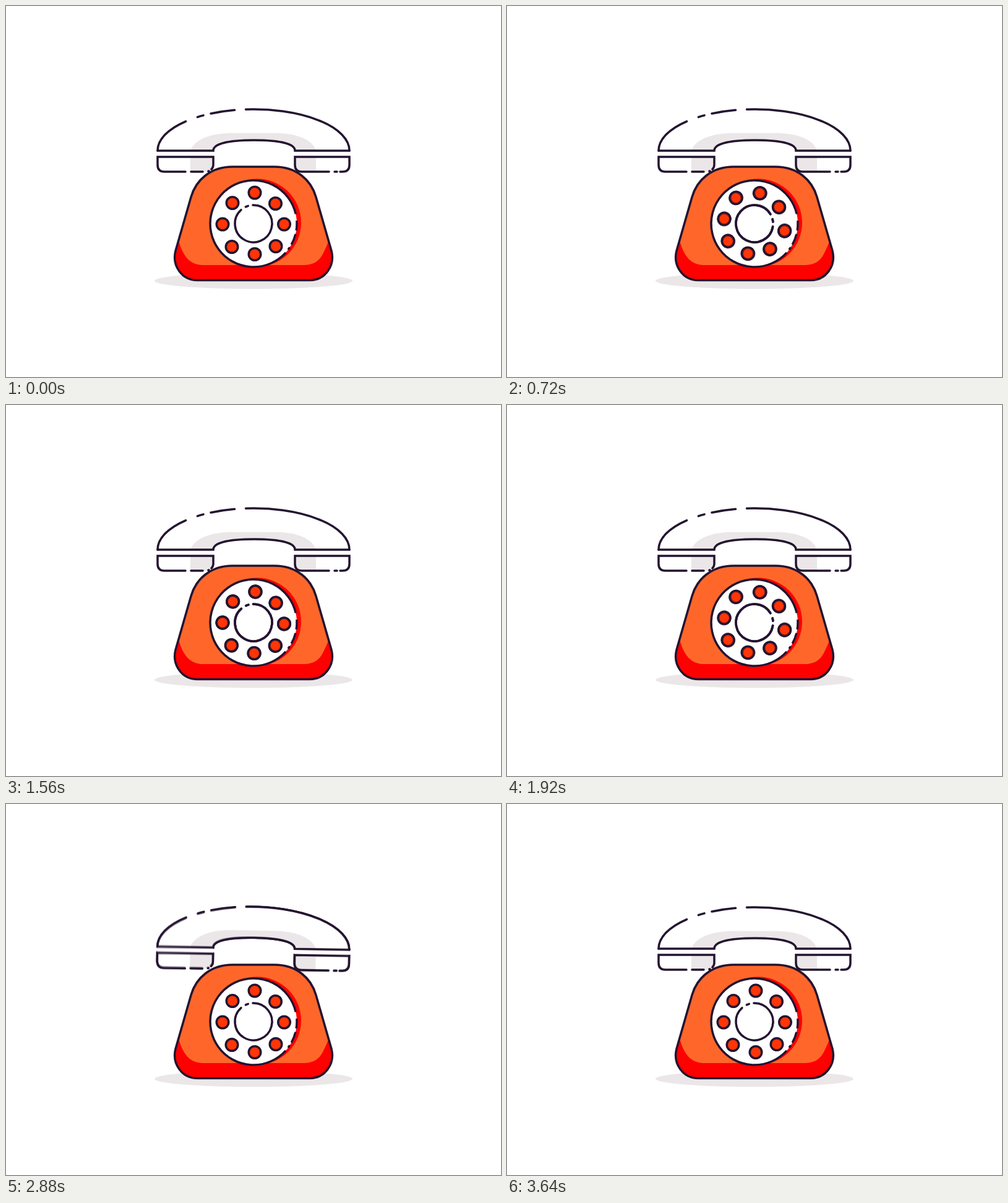
Write an HTML page that moves like this. It is 800 px wide and 600 px high and loops after 3760 ms.

```html
<!DOCTYPE html>
<html lang="en">
<head>
<meta charset="utf-8">
<title>Ringing telephone</title>
<style>
  html, body { margin: 0; width: 100%; height: 100%; overflow: hidden; background: #fff; }
  svg { display: block; width: 100%; height: 100%; }
  .line { fill: none; stroke: #241430; stroke-width: 3.5; stroke-linecap: round; stroke-linejoin: miter; }
  .shade { fill: #ebe7e8; }
  .white { fill: #fff; }
  .red { fill: #f00; }
</style>
</head>
<body>
<svg viewBox="0 0 800 600">
  <defs>
    <path id="body" d="M366 260H434C469 260 493 281 501 309L526 396C532 420 516 443.500 491 443.500H309C284 443.500 268 420 274 396L299 309C307 281 331 260 366 260Z"/>
    <clipPath id="bodyClip"><use href="#body"/></clipPath>
    <g id="rotor">
      <path id="hub" class="line"/>
      <g id="holes" class="line" style="fill:#ff3507"></g>
    </g>
    <g id="handset">
      <path class="white" d="M245 234A155 67 0 0 1 555 234V257Q555 268 544 268H478Q467 268 467 257V234C467 222 440 217 401 217S335 222 335 234V257Q335 268 324 268H256Q245 268 245 257Z"/>
      <path class="shade" d="M298 234C305 214 335 205.500 365 205.500H435C465 205.500 495 214 501 234H467C467 222 440 217 401 217S335 222 335 234Z"/>
      <path class="shade" d="M298 244H335V257Q335 268 324 268H298ZM467 244H501V268H478Q467 268 467 257Z"/>
      <path class="line" d="M245 234H335C335 222 362 217 401 217S467 222 467 234H555"/>
      <path id="crown" class="line"/>
      <path class="line" d="M335 257V244H245V257Q245 268 256 268H290M299 268H318M327 267.300L328 267M332 264Q335 261 335 257"/>
      <path class="line" d="M522 268H478Q467 268 467 257V244H555V257Q555 268 544 268H540M531 268H535"/>
    </g>
  </defs>

  <ellipse class="shade" cx="400" cy="444.500" rx="160" ry="13"/>
  <use href="#body" fill="#ff672a"/>
  <g clip-path="url(#bodyClip)">
    <path class="red" d="M260 340L280 383C288 409 300 419 320 419H480C500 419 508 410 514 397L540 340V460H260Z"/>
    <circle class="red" cx="406" cy="350.500" r="71"/>
  </g>
  <use href="#body" class="line"/>
  <circle class="white" cx="400" cy="352" r="70"/>
  <path id="rim" class="line" style="stroke-linecap:butt"/>
  <g id="rotorLayer"></g>
  <g id="handsetLayer"></g>
</svg>
<script>
const LOOP = 3760, STEP = 40, SHUTTER = 20, SAMPLES = 9;
const NS = 'http://www.w3.org/2000/svg';
const $ = id => document.getElementById(id);

function add(parent, tag, attrs) {
  const el = document.createElementNS(NS, tag);
  for (const key in attrs) el.setAttribute(key, attrs[key]);
  return parent.appendChild(el);
}

// Arcs around the dial centre, given as [from, to] in degrees.
function arcs(radius, spans) {
  const point = deg => {
    const a = deg * Math.PI / 180;
    return `${400 + radius * Math.cos(a)} ${352 + radius * Math.sin(a)}`;
  };
  return spans.map(([from, to]) =>
    `M${point(from)}A${radius} ${radius} 0 ${+(to - from > 180)} 1 ${point(to)}`).join('');
}

// Pieces of the handset's elliptic top, given as [left, right] x positions.
function crownPieces(spans) {
  const point = x => `${x} ${234 - 67 * Math.sqrt(1 - ((x - 400) / 155) ** 2)}`;
  return spans.map(([from, to]) => `M${point(from)}A155 67 0 0 1 ${point(to)}`).join('');
}

$('rim').setAttribute('d', arcs(70, [[-4, -1], [-1, 9], [14, 29], [33, 37], [42, 347]]));
$('hub').setAttribute('d', arcs(30, [[-92, 228], [-115, -107]]));
$('crown').setAttribute('d', crownPieces([[245, 290.5], [309.5, 319], [331, 369.5], [387.5, 555]]));

const holes = [[2, -50], [35.5, -32.5], [49.5, 1], [36, 36.5], [2, 49.5], [-35, 37.5], [-50, 1], [-34, -33.5]];
for (const [x, y] of holes) add($('holes'), 'circle', { cx: 400 + x, cy: 352 + y, r: 9.75 });

const smooth = s => s * s * (3 - 2 * s);

// Cubic bezier (.5, 0, .5, 1), solved by bisection.
function strong(u) {
  let low = 0, high = 1;
  for (let i = 0; i < 24; i++) {
    const s = (low + high) / 2;
    if (1.5 * s * (1 - s) + s ** 3 < u) low = s; else high = s;
  }
  return smooth(low);
}

function track(keys, ease, t) {
  if (t <= keys[0][0]) return keys[0][1];
  for (let i = 1; i < keys.length; i++) {
    const [t0, a] = keys[i - 1], [t1, b] = keys[i];
    if (t < t1) return a + (b - a) * ease((t - t0) / (t1 - t0));
  }
  return keys[keys.length - 1][1];
}

const DIAL = [[320, 0], [800, 105.8], [1400, 0]];
const LIFT = [[2840, 0], [3240, -53], [3400, 12], [3640, 0]];
const TILT = [[2840, 0], [3040, 9], [3200, 8.8], [3400, -13], [3520, 6], [3640, 0]];

function rotorPose(t) {
  const local = t >= 1520 ? t - 1200 : t;
  return `rotate(${track(DIAL, strong, local)} 400 352)`;
}

function handsetPose(t) {
  return `translate(0 ${track(LIFT, strong, t)}) rotate(${track(TILT, smooth, t)} 400 217)`;
}

// Stacked copies with falling opacity average into motion blur.
function blurred(layer, href, pose) {
  const copies = Array.from({ length: SAMPLES }, (_, i) =>
    add(layer, 'use', { href, opacity: 1 / (i + 1) }));
  const rest = pose(0);
  return t => {
    const moving = pose(t) !== rest;
    copies.forEach((copy, i) => {
      const side = i % 2 ? 1 : -1;
      const offset = side * Math.ceil(i / 2) / (SAMPLES - 1) * SHUTTER;
      copy.setAttribute('transform', pose(moving ? t + offset : t));
      copy.setAttribute('display', moving || i === 0 ? 'inline' : 'none');
    });
  };
}

const drawRotor = blurred($('rotorLayer'), '#rotor', rotorPose);
const drawHandset = blurred($('handsetLayer'), '#handset', handsetPose);

function draw(now) {
  const t = Math.floor((now % LOOP) / STEP) * STEP;
  drawRotor(t);
  drawHandset(t);
}

const start = performance.now();
function tick() {
  draw(performance.now() - start);
  requestAnimationFrame(tick);
}
tick();
</script>
</body>
</html>
```
